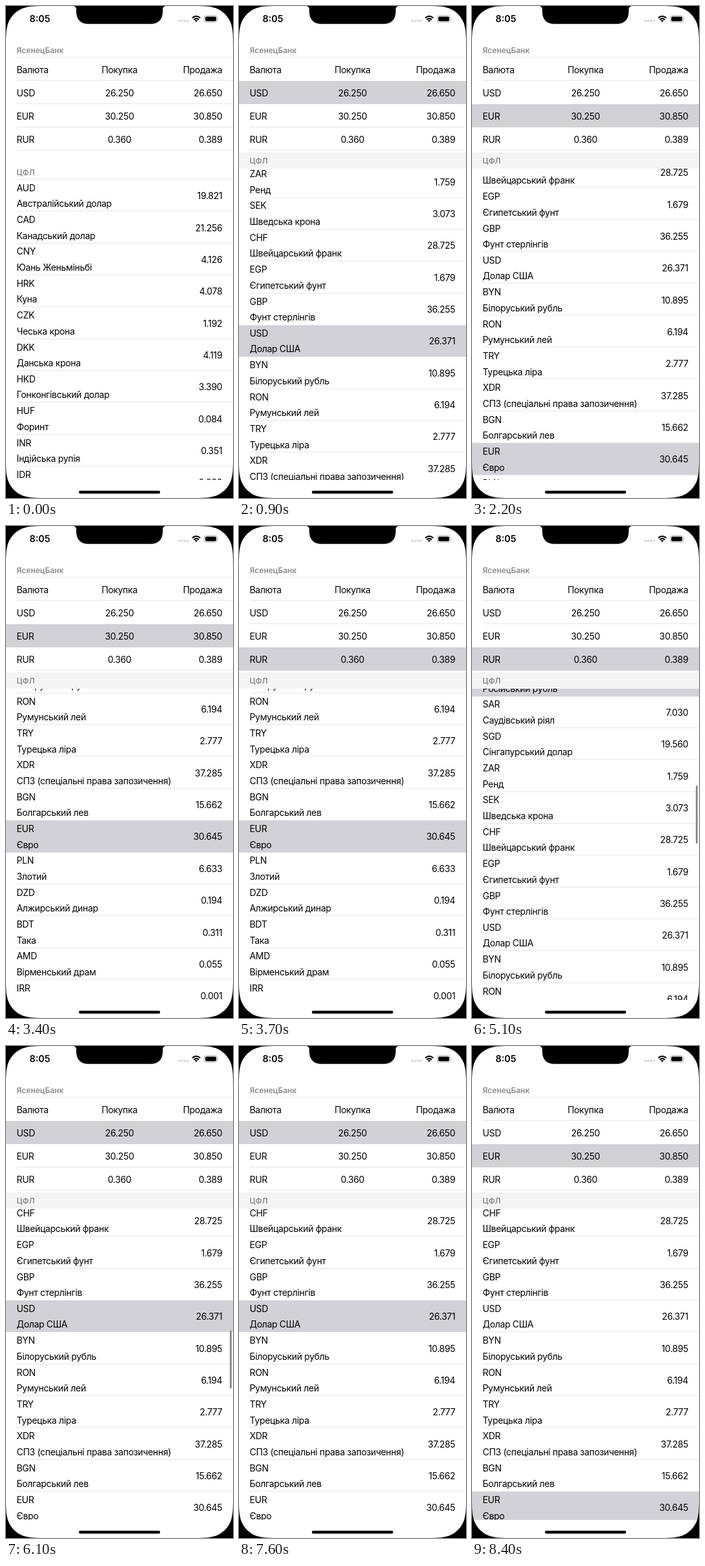
Recreate the animation shown at these times as an HTML page. Size 352x762 px, loop 8700 ms.

```html
<!DOCTYPE html>
<html lang="uk">
<head>
<meta charset="utf-8">
<title>Курси валют</title>
<style>
  html, body { margin: 0; width: 100%; height: 100%; overflow: hidden; background: #000; }
  #screen {
    position: absolute; left: 0; top: 0; width: 352px; height: 762px;
    overflow: hidden; background: #fff; color: #000;
    font: 14px/20px Inter, "Noto Sans", sans-serif; letter-spacing: -.32px;
  }
  #screen div, #screen span, svg { position: absolute; white-space: nowrap; }
  .title {
    left: 0; width: 352px; box-sizing: border-box; padding-left: 16.5px;
    font-size: 12px; font-weight: 600; letter-spacing: 0; color: #8a8a8e;
  }
  .row { left: 0; width: 352px; }
  .row::after, .first::before {
    content: ""; position: absolute; left: 17px; right: 0; bottom: 0;
    height: 1px; background: #e5e5e7;
  }
  .first::before { bottom: auto; top: -1px; }
  .on { background: #d1d1d6; }
  .on::after, .row:has(+ .on)::after { background: none; }
  .l { left: 16.5px; }
  .c { left: 0; width: 352px; text-align: center; }
  .r { right: 16.7px; }
  #list { left: 0; top: 227px; width: 352px; height: 507px; overflow: hidden; }
  #rows { left: 0; top: 42px; width: 352px; }
  #head { top: 0; height: 24.5px; line-height: 25px; }
  #bar { left: 346.5px; top: 3.5px; width: 3px; height: 90px; border-radius: 2px; background: #8e8e90; }
  #clock { left: 36.5px; top: 10px; font-size: 14.3px; font-weight: 600; letter-spacing: 0; }
</style>
</head>
<body>
<div id="screen">
  <div class="title" style="top:59px">ЯсенецБанк</div>
  <div id="bank"></div>
  <div id="list">
    <div id="rows"></div>
    <div id="head" class="title">ЦФЛ</div>
    <div id="bar"></div>
  </div>
  <div id="clock">8:05</div>
  <svg width="352" height="762" style="left:0;top:0">
    <defs>
      <path id="corner" transform="scale(42.7)"
        d="M0 0H1.528C1.088 0 .868 0 .631 .075C.373 .169 .169 .373 .075 .631C0 .868 0 1.088 0 1.528Z"/>
      <g id="top"><use href="#corner"/><use href="#corner" transform="translate(352 0) scale(-1 1)"/></g>
    </defs>
    <use href="#top"/>
    <use href="#top" transform="translate(0 762) scale(1 -1)"/>
    <path d="M103 0C107 0 109 2 109 6V8.5C109 21 115.5 27.7 128 27.7H224C236.5 27.7 243 21 243 8.5V6C243 2 245 0 249 0Z"/>
    <g fill="#c9c9cb">
      <circle cx="268.5" cy="23" r="1.6"/><circle cx="273" cy="23" r="1.6"/>
      <circle cx="277.5" cy="23" r="1.6"/><circle cx="282" cy="23" r="1.6"/>
    </g>
    <g fill="none" stroke="#000" stroke-width="2">
      <path d="M288.7 18.6Q295 13 301.3 18.6"/>
      <path d="M291 21.2Q295 17.6 299 21.2"/>
    </g>
    <path d="M292.7 22.6Q295 20.8 297.3 22.6L295 25Z"/>
    <rect x="307.5" y="15" width="20" height="10" rx="3" fill="none" stroke="#a5a5a7"/>
    <rect x="309" y="16.5" width="17" height="7" rx="1.8"/>
    <path d="M329 18.2Q330.6 20 329 21.8Z" fill="#a5a5a7"/>
    <rect x="113" y="750.7" width="126" height="4.5" rx="2.25"/>
  </svg>
</div>
<script>
const LOOP = 8700, STEP = 100, ROW = 49.35, BANK_ROW = 36.1;
const USD = 26, EUR = 32, RUB = 18;

const bankData = `Валюта|Покупка|Продажа
USD|26.250|26.650
EUR|30.250|30.850
RUR|0.360|0.389`;

const listData = `AUD|Австралійський долар|19.821
CAD|Канадський долар|21.256
CNY|Юань Женьміньбі|4.126
HRK|Куна|4.078
CZK|Чеська крона|1.192
DKK|Данська крона|4.119
HKD|Гонконгівський долар|3.390
HUF|Форинт|0.084
INR|Індійська рупія|0.351
IDR|Рупія|0.002
ILS|Новий ізраїльський шекель|8.160
JPY|Єна|0.232
KZT|Теньге|0.062
KRW|Вона|0.022
MXN|Мексиканське песо|1.307
MDL|Молдовський лей|1.505
NZD|Новозеландський долар|18.898
NOK|Норвезька крона|3.146
RUB|Російський рубль|0.376
SAR|Саудівський ріял|7.030
SGD|Сінгапурський долар|19.560
ZAR|Ренд|1.759
SEK|Шведська крона|3.073
CHF|Швейцарський франк|28.725
EGP|Єгипетський фунт|1.679
GBP|Фунт стерлінгів|36.255
USD|Долар США|26.371
BYN|Білоруський рубль|10.895
RON|Румунський лей|6.194
TRY|Турецька ліра|2.777
XDR|СПЗ (спеціальні права запозичення)|37.285
BGN|Болгарський лев|15.662
EUR|Євро|30.645
PLN|Злотий|6.633
DZD|Алжирський динар|0.194
BDT|Така|0.311
AMD|Вірменський драм|0.055
IRR|Іранський ріал|0.001`;

const $ = id => document.getElementById(id);

// cells: [class, centre y] for each column
function build(box, data, top, height, cells) {
  return data.split("\n").map((line, i) => {
    const row = document.createElement("div");
    row.className = i ? "row" : "row first";
    row.style.top = top + i * height + "px";
    row.style.height = height + "px";
    line.split("|").forEach((text, k) => {
      const cell = document.createElement("span");
      cell.className = cells[k][0];
      cell.style.top = cells[k][1] - 10 + "px";
      cell.textContent = text;
      row.append(cell);
    });
    box.append(row);
    return row;
  });
}

const bankRows = build($("bank"), bankData, 80, BANK_ROW, [["l", 18.6], ["c", 18.6], ["r", 18.6]]);
const listRows = build($("rows"), listData, 0, ROW, [["l", 12.8], ["l", 37.4], ["r", 25.3]]);

// scroll offset that puts a row in the middle of the list
const middle = row => 1392.2 + (row - EUR) * ROW;
const smooth = x => Math.sin(Math.PI / 2 * x) ** 2;
const flick = x => smooth(x ** .81);

const bankPicks = [[0, -1], [700, 1], [2100, 2], [3700, 3], [6000, 1], [8200, 2]];
const listPicks = [[0, -1], [700, USD], [2100, EUR], [3800, RUB], [6000, USD], [8200, EUR]];
const moves = [
  [636, 300, middle(USD), smooth],
  [2099, 300, middle(EUR), smooth],
  [3750, 300, middle(RUB), smooth],
  [4700, 900, 1158, flick]
];

const pick = (table, t) => table.filter(p => p[0] <= t).pop()[1];
const mark = (rows, n) => rows.forEach((row, i) => row.classList.toggle("on", i === n));

function offset(t) {
  let y = 0;
  for (const [start, time, to, ease] of moves) {
    if (t > start) y += (to - y) * ease(Math.min(1, (t - start) / time));
  }
  return y;
}

function barOpacity(t) {
  return t < 4800 ? 0 : Math.max(0, Math.min(1, (6300 - t) / 200));
}

function draw(t) {
  const y = offset(t);
  mark(bankRows, pick(bankPicks, t));
  mark(listRows, pick(listPicks, t));
  $("rows").style.transform = `translateY(${-y}px)`;
  $("head").style.transform = `translateY(${Math.max(0, 17.5 - y)}px)`;
  $("head").style.background = y > 17.5 ? "#f4f4f5" : "none";
  $("bar").style.transform = `translateY(${y * .181}px)`;
  $("bar").style.opacity = barOpacity(t);
}

const began = performance.now();
function tick() {
  const t = (performance.now() - began) % LOOP;
  draw(Math.floor(t / STEP) * STEP);
  requestAnimationFrame(tick);
}
tick();
</script>
</body>
</html>
```
